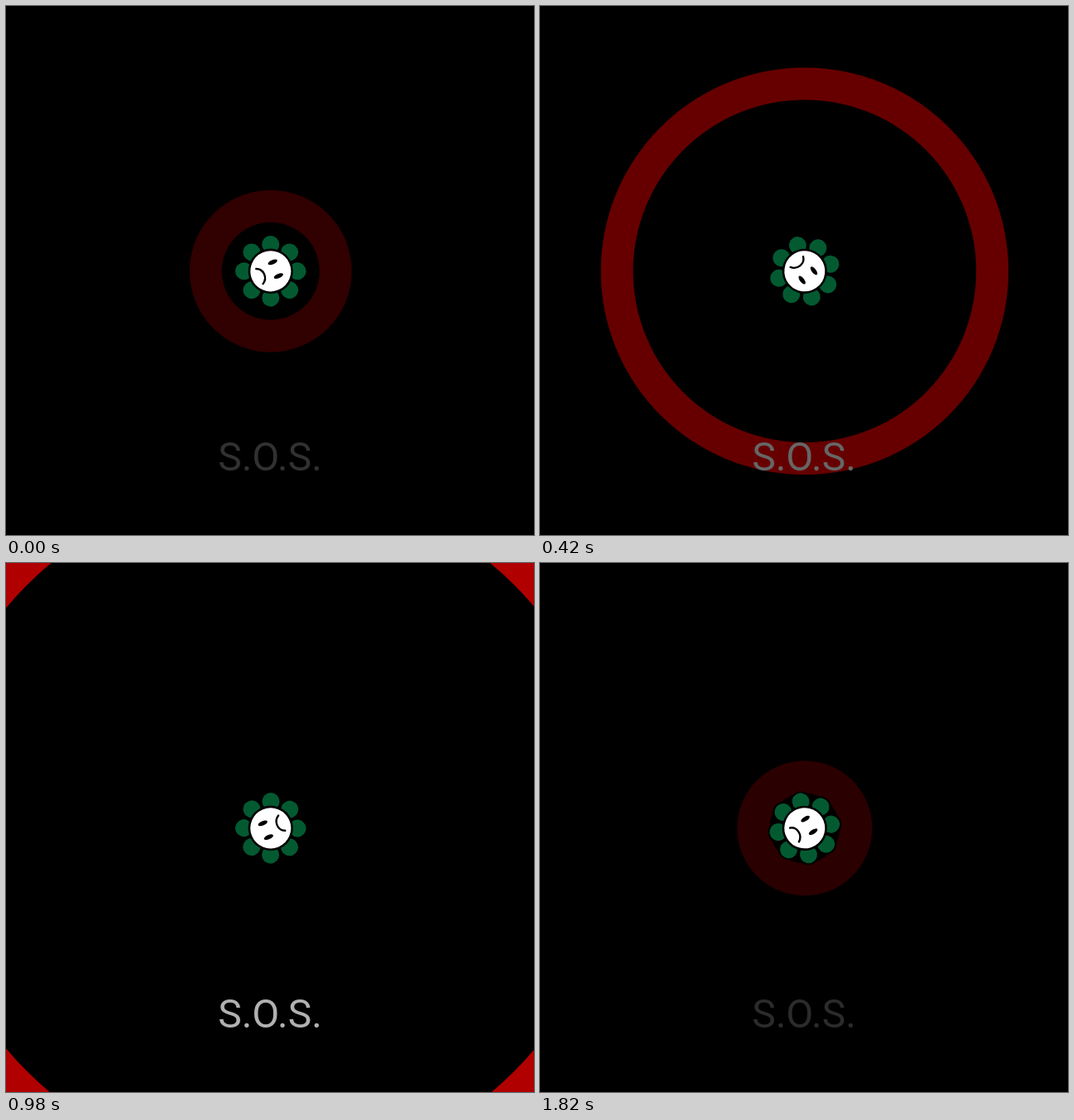
An HTML page with a canvas that plays this animation: 638 px wide and 640 px high, repeating every 1.89 s.

```html
<!DOCTYPE html>
<html lang="en">
<head>
<meta charset="utf-8">
<title>S.O.S.</title>
<style>
  html, body { margin: 0; width: 100%; height: 100%; overflow: hidden; background: #000; }
  canvas { display: block; }
</style>
</head>
<body>
<canvas id="stage" width="638" height="640"></canvas>
<script>
const ctx = document.getElementById('stage').getContext('2d');
const TAU = Math.PI * 2;
const STEP = 70, STEPS = 27;
const CX = 319.8, CY = 320.8;

// [step, progress]: one pulse runs from 0 to 1
const keys = [[0, 0.186], [4, 0.327], [8, 0.461], [10, 0.544],
              [14, 0.687], [19, 0.872], [26, 1.163], [27, 1.186]];

function progress(step) {
  const i = keys.findIndex(k => k[0] > step);
  const [s0, p0] = keys[i - 1], [s1, p1] = keys[i];
  return (p0 + (p1 - p0) * (step - s0) / (s1 - s0)) % 1;
}

function disc(x, y, rx, ry = rx) {
  ctx.beginPath();
  ctx.ellipse(x, y, rx, ry, 0, 0, TAU);
}

function drawRing(p, level) {
  const outer = 98 + 713 * (p - 0.186);
  if (outer <= 0) return;
  const inner = Math.max(0, outer - 39);
  ctx.beginPath();
  ctx.arc(CX, CY, outer, 0, TAU);
  ctx.arc(CX, CY, inner, 0, TAU, true);
  ctx.fillStyle = `rgb(${level},0,0)`;
  ctx.fill();
}

function drawFlower(angle) {
  ctx.save();
  ctx.translate(CX, CY);
  ctx.rotate(angle);
  ctx.strokeStyle = '#000';
  ctx.lineCap = 'round';

  ctx.fillStyle = '#035a31';
  ctx.lineWidth = 2;
  for (let i = 0; i < 8; i++) {
    const a = i * TAU / 8 - 67 * TAU / 360;
    disc(32.3 * Math.cos(a), 32.3 * Math.sin(a), 11.5);
    ctx.fill();
    ctx.stroke();
  }

  ctx.fillStyle = '#fff';
  ctx.lineWidth = 2.6;
  disc(0, 0, 25.8);
  ctx.fill();
  ctx.stroke();

  ctx.fillStyle = '#000';
  for (const x of [-9.1, 9.1]) {
    disc(x, -6.5, 2.6, 6);
    ctx.fill();
  }
  ctx.lineWidth = 2.4;
  ctx.beginPath();
  ctx.moveTo(-9.5, 15);
  ctx.bezierCurveTo(-6, 6.5, 6, 6.5, 10.5, 14.5);
  ctx.stroke();
  ctx.restore();
}

function drawLabel(level) {
  ctx.font = '48px Roboto, Arial, sans-serif';
  ctx.textAlign = 'center';
  ctx.fillStyle = `rgb(${level},${level},${level})`;
  ctx.fillText('S.O.S.', 319, 562);
}

function draw(now) {
  const p = progress(Math.floor(now / STEP) % STEPS);
  const level = Math.round(255 * Math.min(1, p + 0.006));
  ctx.fillStyle = '#000';
  ctx.fillRect(0, 0, 638, 640);
  drawRing(p, level);
  drawLabel(level);
  drawFlower(p * TAU);
}

let start;
function tick(now) {
  if (start === undefined) start = now;
  draw(Math.max(0, now - start));
  requestAnimationFrame(tick);
}
draw(0);
requestAnimationFrame(tick);
</script>
</body>
</html>
```
